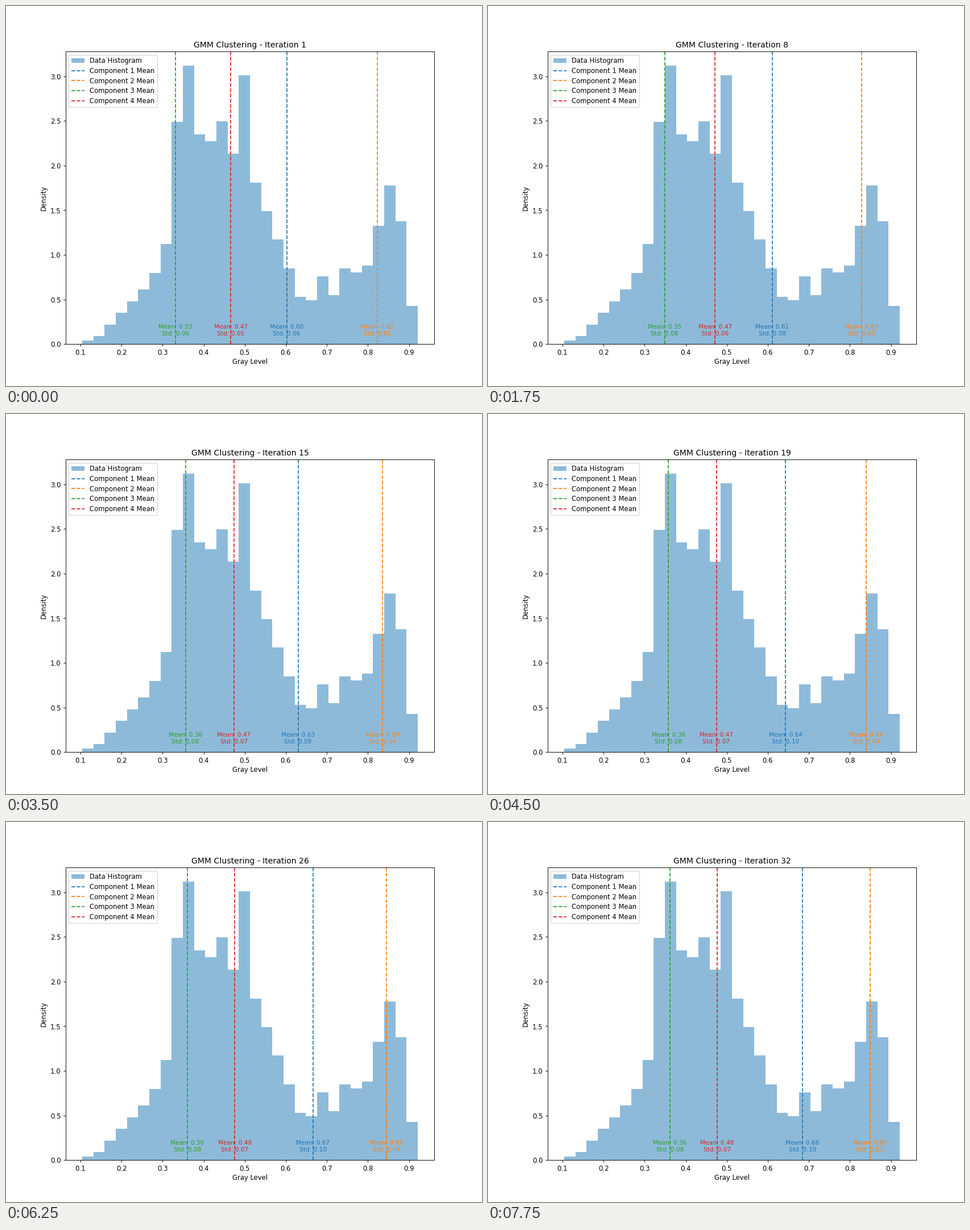
These frames come from a looping animation (837 px wide and 669 px high, 8 s). A matplotlib script:

```python
import numpy as np
import matplotlib.pyplot as plt
from matplotlib.animation import FuncAnimation

STEPS = 32
INTERVAL = 250
BINS = 30
LOW, HIGH = 0.1045, 0.9212
LABEL_Y = 0.157


def density():
    """Bar heights: straight trends between corner bars, plus lone spikes."""
    corners = {0: 0.04, 1: 0.09, 5: 0.61, 6: 0.80, 7: 1.12, 8: 2.49,
               13: 2.13, 15: 1.81, 19: 0.53, 20: 0.495, 25: 0.88,
               27: 1.775, 28: 1.377, 29: 0.43}
    spikes = {9: 0.702, 12: 0.29, 14: 1.04, 21: 0.19, 22: -0.10, 23: 0.12}
    heights = np.interp(np.arange(BINS), list(corners), list(corners.values()))
    for i, extra in spikes.items():
        heights[i] += extra
    return heights


def settle(start, span, pace, power=1.0):
    """Value at each iteration while it eases from start by up to span."""
    t = np.arange(STEPS) / pace
    return start + span * (1 - np.exp(-t**power))


# Colour, mean and deviation of each component
COMPONENTS = [
    ("tab:blue", settle(0.6022, 0.13, 30.9, 1.8), settle(0.063, 0.042, 10)),
    ("tab:orange", settle(0.8228, 0.036, 25.8, 1.3),
     settle(0.0545, -0.0273, 25.8, 1.3)),
    ("tab:green", settle(0.3315, 0.0325, 9.68, 0.85),
     settle(0.0643, 0.0215, 10)),
    ("tab:red", settle(0.466, 0.014, 18, 0.65), settle(0.054, 0.02, 10)),
]

fig, ax = plt.subplots(figsize=(10.001, 7.994), dpi=83.7)

edges = np.linspace(LOW, HIGH, BINS + 1)
centers = (edges[:-1] + edges[1:]) / 2
ax.hist(centers, bins=edges, weights=density(), alpha=0.5, color="tab:blue",
        label="Data Histogram")

lines, labels = [], []
for k, (color, mean, _) in enumerate(COMPONENTS, start=1):
    lines.append(ax.axvline(mean[0], color=color, linestyle="--",
                            label=f"Component {k} Mean"))
    labels.append(ax.text(mean[0], LABEL_Y, "", color=color, fontsize=9,
                          ha="center", va="center"))

ax.set_xlabel("Gray Level", labelpad=3)
ax.set_ylabel("Density")
title = ax.set_title("")
ax.legend(loc="upper left", labelspacing=0.4, borderpad=0.36)


def update(frame):
    title.set_text(f"GMM Clustering - Iteration {frame + 1}")
    for line, label, (_, mean, std) in zip(lines, labels, COMPONENTS):
        x = mean[frame]
        line.set_xdata([x, x])
        label.set_x(x)
        label.set_text(f"Mean: {x:.2f}\nStd: {std[frame]:.2f}")
    return [title, *lines, *labels]


anim = FuncAnimation(fig, update, frames=STEPS, interval=INTERVAL,
                     repeat=True, repeat_delay=0)
plt.show()
```
